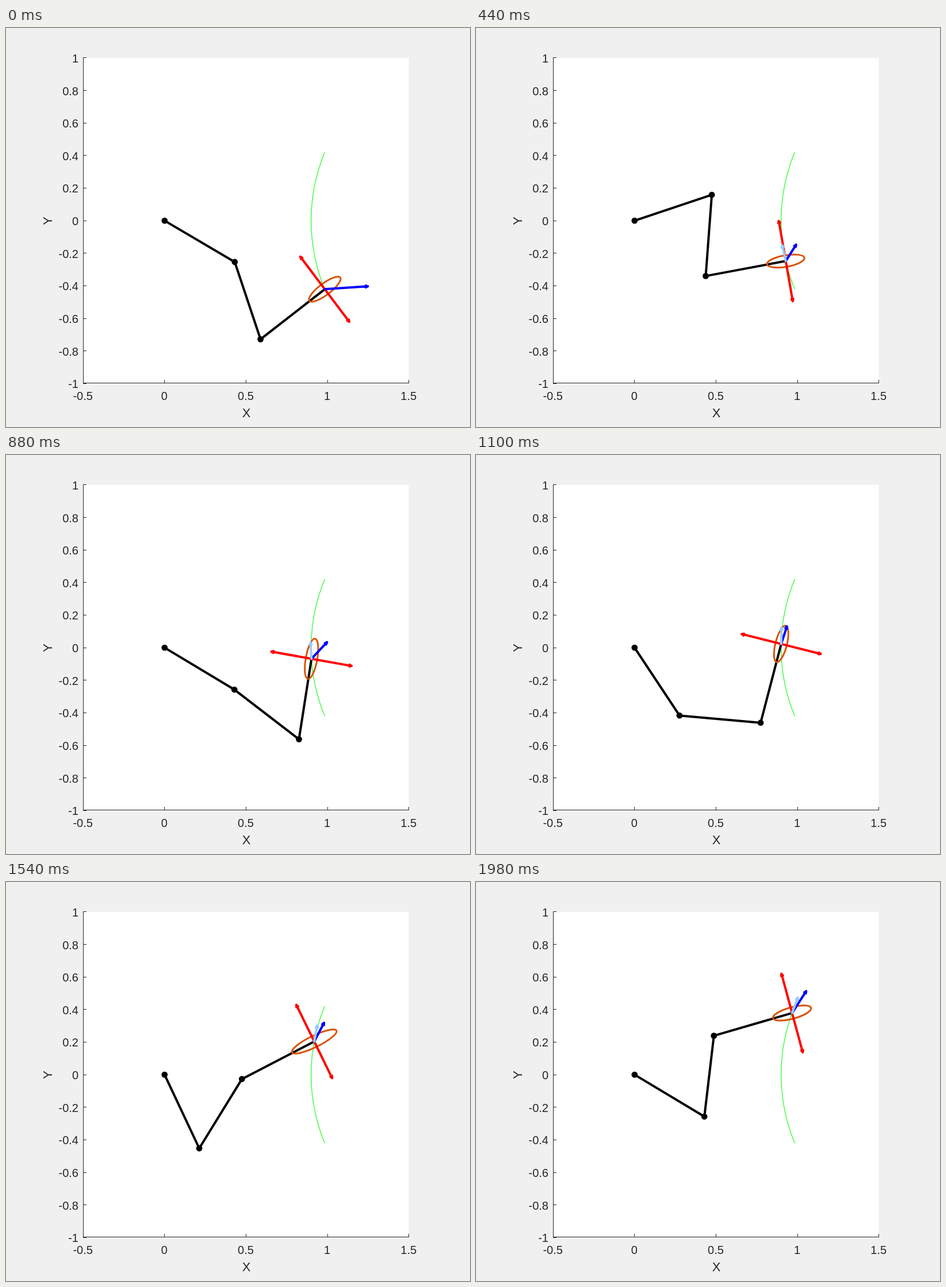
These frames come from a looping animation (807 px wide and 694 px high, 2.09 s). An HTML page:

```html
<!DOCTYPE html>
<html lang="en">
<head>
<meta charset="utf-8">
<title>Planar arm</title>
<style>
  html, body { margin: 0; width: 100%; height: 100%; overflow: hidden; background: #f0f0f0; }
  svg { display: block; width: 807px; height: 694px; }
  text { font: 20px "Liberation Sans", Arial, sans-serif; fill: #262626; text-anchor: middle; }
  #yLabels text { text-anchor: end; }
  .name { font-size: 22px; }
  #axes { stroke: #262626; fill: none; shape-rendering: crispEdges; }
  #trace { stroke: #1dff1d; fill: none; stroke-width: 1.2; }
  #arm { stroke: #000; fill: none; stroke-width: 4; stroke-linejoin: round; }
  #ellipse { stroke: #d95306; fill: none; stroke-width: 3; }
  .arrow { fill: none; stroke-width: 4; stroke-linejoin: round; stroke-linecap: round; }
  #axis { stroke: #f00; }
  #actual { stroke: #00f; }
  #wanted { stroke: #99ccff; }
</style>
</head>
<body>
<svg viewBox="0 0 807 694">
  <rect x="134" y="52" width="566.5" height="566" fill="#fff"/>
  <path id="axes"/>
  <g id="xLabels"></g>
  <g id="yLabels"></g>
  <text class="name" x="418" y="677">X</text>
  <text class="name" transform="translate(80 335.5) rotate(-90)">Y</text>
  <path id="trace"/>
  <path id="arm"/>
  <circle class="joint" r="5.4"/>
  <circle class="joint" r="5.4"/>
  <circle class="joint" r="5.4"/>
  <ellipse id="ellipse" ry="10"/>
  <path id="axis" class="arrow"/>
  <path id="actual" class="arrow"/>
  <path id="wanted" class="arrow"/>
</svg>
<script>
const STEP = 110, COUNT = 19, SCALE = 283.25, LINK = 0.5, RADIUS = 1.1;
const RAD = Math.PI / 180;
const $ = id => document.getElementById(id);
const px = ([x, y]) => [275.8 + x * SCALE, 335.1 - y * SCALE];
const polar = (r, a) => [r * Math.cos(a), r * Math.sin(a)];
const add = (p, q) => [p[0] + q[0], p[1] + q[1]];
const angle = (p, q) => Math.atan2(q[1] - p[1], q[0] - p[0]);

// Shoulder angle in degrees at each step
const shoulder = [-30.5, -4, 15.2, 20.2, 18.5, 12.5, 2.3, -15.5, -31, -44.5,
  -56.5, -70, -77.15, -72.9, -64.8, -52.6, -43.4, -36.4, -31];

// Velocity arrow: step, then x and y in pixels
const velocity = [[0, 75, 5], [2, -8, 30], [6, 44, 27], [10, 10, 30.5],
  [12, 9, 34], [14, 17, 32.5], [18, 24.5, 38]];

function velocityAt(i) {
  const k = Math.max(1, velocity.findIndex(v => v[0] >= i));
  const a = velocity[k - 1], b = velocity[k];
  const u = (i - a[0]) / (b[0] - a[0]);
  return [1, 2].map(n => (a[n] + (b[n] - a[n]) * u) / SCALE);
}

// Point on the followed arc, u from 0 to 1
const arcAngle = u => (45 * u - 22.5) * RAD;
function onArc(u) {
  const a = arcAngle(u);
  return [2 - RADIUS * Math.cos(a), RADIUS * Math.sin(a)];
}

function arrow(from, vec) {
  const [x, y] = px(from);
  const end = px(add(from, vec));
  const dir = Math.atan2(end[1] - y, end[0] - x);
  const barb = side => add(end, polar(4, dir + Math.PI + side * 0.4));
  return `M${x} ${y}L${end}M${barb(1)}L${end}L${barb(-1)}`;
}

function label(group, x, y, value) {
  const t = document.createElementNS("http://www.w3.org/2000/svg", "text");
  t.setAttribute("x", x);
  t.setAttribute("y", y);
  t.textContent = value;
  $(group).append(t);
}

function buildAxes() {
  let d = "M134.5 52V618M134 617.5H701";
  for (let i = 0; i <= 10; i++) {
    const v = (i - 5) / 5, y = 335.1 - v * SCALE;
    d += `M134 ${Math.floor(y) + 0.5}h6`;
    label("yLabels", 126, y + 8, v);
  }
  for (let i = -1; i <= 3; i++) {
    const x = 275.8 + i / 2 * SCALE;
    d += `M${Math.floor(x) + 0.5} 618v-6`;
    label("xLabels", x - 0.5, 647, i / 2);
  }
  $("axes").setAttribute("d", d);
  const points = Array.from({ length: 41 }, (_, i) => px(onArc(i / 40)));
  $("trace").setAttribute("d", "M" + points.join("L"));
}

function draw(i) {
  const u = i / COUNT, tip = onArc(u);
  const upper = polar(LINK, shoulder[i] * RAD);
  const reach = Math.hypot(tip[0] - upper[0], tip[1] - upper[1]);
  const bend = Math.acos(Math.min(1, reach / (2 * LINK))) * (i < 13 ? -1 : 1);
  const lower = add(upper, polar(LINK, angle(upper, tip) + bend));
  const joints = [[0, 0], upper, lower];

  $("arm").setAttribute("d", "M" + [...joints, tip].map(px).join("L"));
  document.querySelectorAll(".joint").forEach((c, n) => {
    const [x, y] = px(joints[n]);
    c.setAttribute("cx", x);
    c.setAttribute("cy", y);
  });

  // The ellipse lies nearly along the last link and grows as the elbow straightens
  const last = angle(lower, tip), turn = -2 * bend;
  const tilt = last + 1.5 * RAD * Math.sin(2 * turn);
  const e = $("ellipse");
  e.setAttribute("rx", 32 + 15 * Math.cos(turn) ** 2);
  e.setAttribute("transform", `translate(${px(tip)}) rotate(${-tilt / RAD})`);

  $("axis").setAttribute("d", [1, -1].map(s =>
    arrow(tip, polar(0.25, tilt + s * Math.PI / 2))).join(""));
  $("actual").setAttribute("d", arrow(tip, velocityAt(i)));
  $("wanted").setAttribute("d", i ? arrow(tip, polar(0.1, Math.PI / 2 - arcAngle(u))) : "");
}

let shown = -1;
const start = performance.now();
function tick() {
  const i = Math.floor((performance.now() - start) / STEP) % COUNT;
  if (i !== shown) draw(shown = i);
  requestAnimationFrame(tick);
}
buildAxes();
tick();
</script>
</body>
</html>
```
